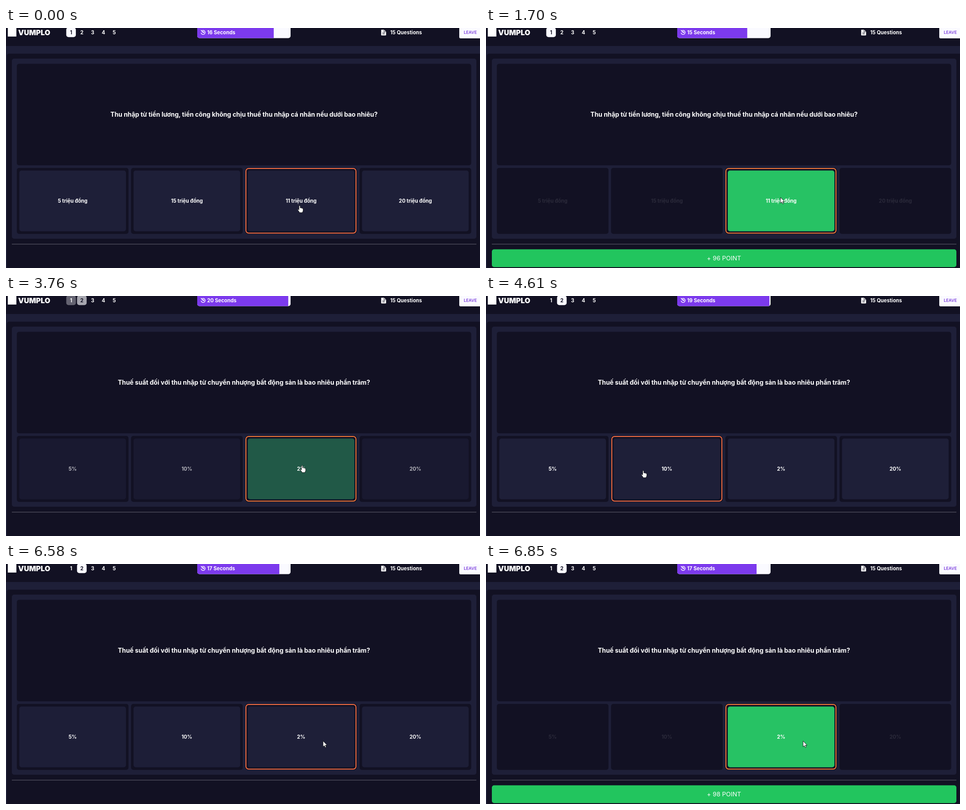
An HTML page that plays this animation: 1051x533 px, repeating every 8000 ms.

```html
<!DOCTYPE html>
<html lang="vi">
<head>
<meta charset="utf-8">
<title>Quiz</title>
<style>
  html, body { margin: 0; width: 100%; height: 100%; overflow: hidden; background: #121123; }
  svg { display: block; width: 1051px; height: 533px; }
  text { font: 700 11.2px Inter, "Noto Sans", sans-serif; fill: #fff; }
  .mid { text-anchor: middle; }
  .dark { fill: #121123; }
  .panel { fill: #1e1f38; }
  #question { font-size: 13.85px; }
  #points text { font-size: 13.7px; font-weight: 400; }
  .leave { font-size: 9.4px; font-weight: 500; fill: #6d28d9; }
  .brand { font-size: 16px; font-weight: 900; }
</style>
</head>
<body>
<svg viewBox="0 0 1051 533">
  <defs>
    <clipPath id="timerClip"><rect x="424" y="-8" width="207" height="30.5" rx="5"/></clipPath>
  </defs>

  <rect class="dark" width="1051" height="533"/>
  <rect class="panel" y="40" width="1051" height="493"/>
  <path class="dark" d="M2 533V62q0-5 5-5H1051V533Z"/>

  <rect x="4" y="0" width="19" height="19" fill="#fff"/>
  <text class="brand" x="27" y="16">VUMPLO</text>

  <g id="pages"></g>

  <g clip-path="url(#timerClip)">
    <rect x="424" width="207" height="23" fill="#fafaff"/>
    <rect id="bar" x="424" width="165" height="23" fill="#7c3aed"/>
  </g>
  <g fill="none" stroke="#fff" stroke-width="1.4" stroke-linecap="round">
    <path d="M434.6 6.1A4.5 4.5 0 1 1 432.7 11"/>
    <path d="M432.6 5.2l4.6 4.9M437.4 7.6v2.7h2"/>
  </g>
  <text id="seconds" x="446" y="14"></text>

  <path d="M832.3 4.3h5.9l4 4V16h-9.9Z" fill="#fff" stroke="#fff" stroke-linejoin="round"/>
  <path d="M838 4.5v4h4M834.5 10.7h5.5M834.5 13.2h5.5" fill="none" stroke="#121123"/>
  <text x="852" y="14">15 Questions</text>

  <rect x="1005" y="-6" width="60" height="29" rx="3" fill="#fafaff"/>
  <text class="leave mid" x="1029.5" y="13.3">LEAVE</text>

  <rect class="panel" x="13" y="68" width="1030" height="400" rx="5"/>
  <rect class="dark" x="24" y="79.5" width="1007.5" height="225.5" rx="5"/>
  <text id="question" class="mid" x="527.7" y="197"></text>

  <g id="cards"></g>
  <rect id="ring" y="312" width="244" height="143.5" rx="6" fill="none" stroke-width="2"/>

  <rect x="13" y="479.5" width="1030" height="1" fill="#696977"/>
  <g id="points">
    <rect x="13" y="491.5" width="1030" height="39.5" rx="5" fill="#22c55e"/>
    <text class="mid" x="527.7" y="516"></text>
  </g>

  <g id="cursor" fill="#fff" stroke="#111" stroke-width=".9" stroke-linejoin="round">
    <path id="hand" d="M-1.3 1.2Q0-.5 1.3 1.2V5.6Q2.6 4.7 3.6 6Q5 5.2 5.8 6.6Q7.6 6.2 7.8 8V11.5Q7.6 13.6 6.4 14.6V16H-.6V14.8L-3.8 10.4Q-4.6 8.6-3 8.5L-1.3 9.8Z"/>
    <path id="arrow" d="M0 0V13L2.9 10.3L4.9 14.6L7 13.6L5 9.5H9Z"/>
  </g>
</svg>

<script>
const LOOP = 8000, SECOND = 975, LIMIT = 20, FADE = 280;
const CORRECT = 2, BAR_X = 424, BAR_WIDTH = 207, PITCH = 253.3;
const $ = id => document.getElementById(id);

// start: timer begins; answer: card is clicked; reveal: result appears;
// carry: seconds the bar still shows from the round before.
const rounds = [
  { ask: "Thu nhập từ tiền lương, tiền công không chịu thuế thu nhập cá nhân nếu dưới bao nhiêu?",
    answers: ["5 triệu đồng", "15 triệu đồng", "11 triệu đồng", "20 triệu đồng"],
    points: 96, start: 900 - 5 * SECOND, answer: 1280, reveal: 1700, carry: LIMIT },
  { ask: "Thuế suất đối với thu nhập từ chuyển nhượng bất động sản là bao nhiêu phần trăm?",
    answers: ["5%", "10%", "2%", "20%"],
    points: 98, start: 3610, answer: 6570, reveal: 6850, carry: 15 }
];

// Turning points of the pointer, eased in between.
const path = [
  { t: 200, x: 651, y: 394 }, { t: 500, x: 653, y: 376 },
  { t: 3610, x: 653, y: 376 }, { t: 4030, x: 666, y: 376 },
  { t: 5020, x: 165, y: 394 }, { t: 5870, x: 880, y: 390 },
  { t: 6300, x: 703, y: 393 }
];

const clamp = (v, lo = 0, hi = 1) => Math.min(hi, Math.max(lo, v));
const ramp = (t, from, length) => clamp((t - from) / length);
const mix = (a, b, p) => a + (b - a) * p;
const swing = p => (1 - Math.cos(Math.PI * p)) / 2;
const easeOut = p => 1 - (1 - p) ** 3;
const show = (id, on) => $(id).style.display = on ? "" : "none";

function pointer(t) {
  const next = clamp(path.findIndex(k => k.t > t), 0, path.length - 1);
  const i = t >= path.at(-1).t ? path.length - 1 : Math.max(1, next);
  const a = path[i - 1], b = path[i];
  const p = swing(ramp(t, a.t, b.t - a.t));
  return { x: mix(a.x, b.x, p), y: mix(a.y, b.y, p) };
}

function timer(round, t) {
  const passed = Math.min(t, round.answer) - round.start;
  const ticks = Math.floor(passed / SECOND);
  const left = LIMIT - ticks;
  const before = ticks ? left + 1 : round.carry;
  const p = easeOut(ramp(t - round.start, ticks * SECOND, FADE));
  return { left, bar: mix(before, left, p) / LIMIT * BAR_WIDTH };
}

function add(parent, tag, attrs, content = "") {
  const el = document.createElementNS("http://www.w3.org/2000/svg", tag);
  for (const key in attrs) el.setAttribute(key, attrs[key]);
  el.textContent = content;
  return parent.appendChild(el);
}

const cardX = i => 24 + PITCH * i;

const cards = rounds[0].answers.map((_, i) => {
  const x = cardX(i), g = $("cards");
  const inner = { x: x + 5.5, y: 316.5, width: 236.5, height: 135, rx: 5 };
  add(g, "rect", { class: "dark", x, y: 310.7, width: 247.6, height: 146.5, rx: 5 });
  return {
    fill: add(g, "rect", { ...inner, class: "panel" }),
    green: add(g, "rect", { ...inner, fill: "#27c264", opacity: 0 }),
    label: add(g, "text", { class: "mid", x: x + 123.8, y: 388 })
  };
});

const pages = [1, 2, 3, 4, 5].map((n, i) => {
  const x = 144.3 + 23.9 * i, g = $("pages");
  return {
    pill: add(g, "rect", { x: x - 10.7, y: -1, width: 21.3, height: 21.3, rx: 5, fill: "#fafaff", opacity: 0 }),
    label: add(g, "text", { class: "mid", x, y: 14 }, n)
  };
});

function draw(t) {
  const index = t < rounds[1].start ? 0 : 1;
  const round = rounds[index];
  const enter = index ? ramp(t, round.start - 30, FADE) : 1;
  const leave = ramp(t, round.answer, FADE);
  const active = enter - leave;
  const revealed = t >= round.reveal;

  $("question").textContent = round.ask;
  const { left, bar } = timer(round, t);
  $("seconds").textContent = left + " Seconds";
  $("bar").setAttribute("width", bar);

  const second = index * enter;
  [1 - second, second].forEach((shown, i) => {
    pages[i].pill.setAttribute("opacity", shown);
    pages[i].label.style.fill = shown > .5 ? "#121123" : "#fff";
  });

  cards.forEach((card, i) => {
    const right = i === CORRECT;
    card.label.textContent = round.answers[i];
    card.label.setAttribute("opacity", right ? 1 : mix(.1, 1, active));
    card.fill.setAttribute("opacity", right ? 1 : active);
    card.green.setAttribute("opacity", right ? (revealed ? 1 : 1 - enter) : 0);
  });

  const { x, y } = pointer(t);
  const hover = clamp(Math.floor((x - cardX(0)) / PITCH), 0, cards.length - 1);
  $("ring").setAttribute("x", Math.round(cardX(hover) + 1.4));
  $("ring").setAttribute("stroke", revealed || enter < 1 ? "#f97a38" : "#fb6f42");

  show("points", revealed);
  $("points").lastElementChild.textContent = `+ ${round.points} POINT`;

  $("cursor").setAttribute("transform", `translate(${x} ${y})`);
  show("hand", !leave);
  show("arrow", leave);
}

let start;
function tick(now) {
  start ??= now;
  draw((now - start) % LOOP);
  requestAnimationFrame(tick);
}
draw(0);
requestAnimationFrame(tick);
</script>
</body>
</html>
```
